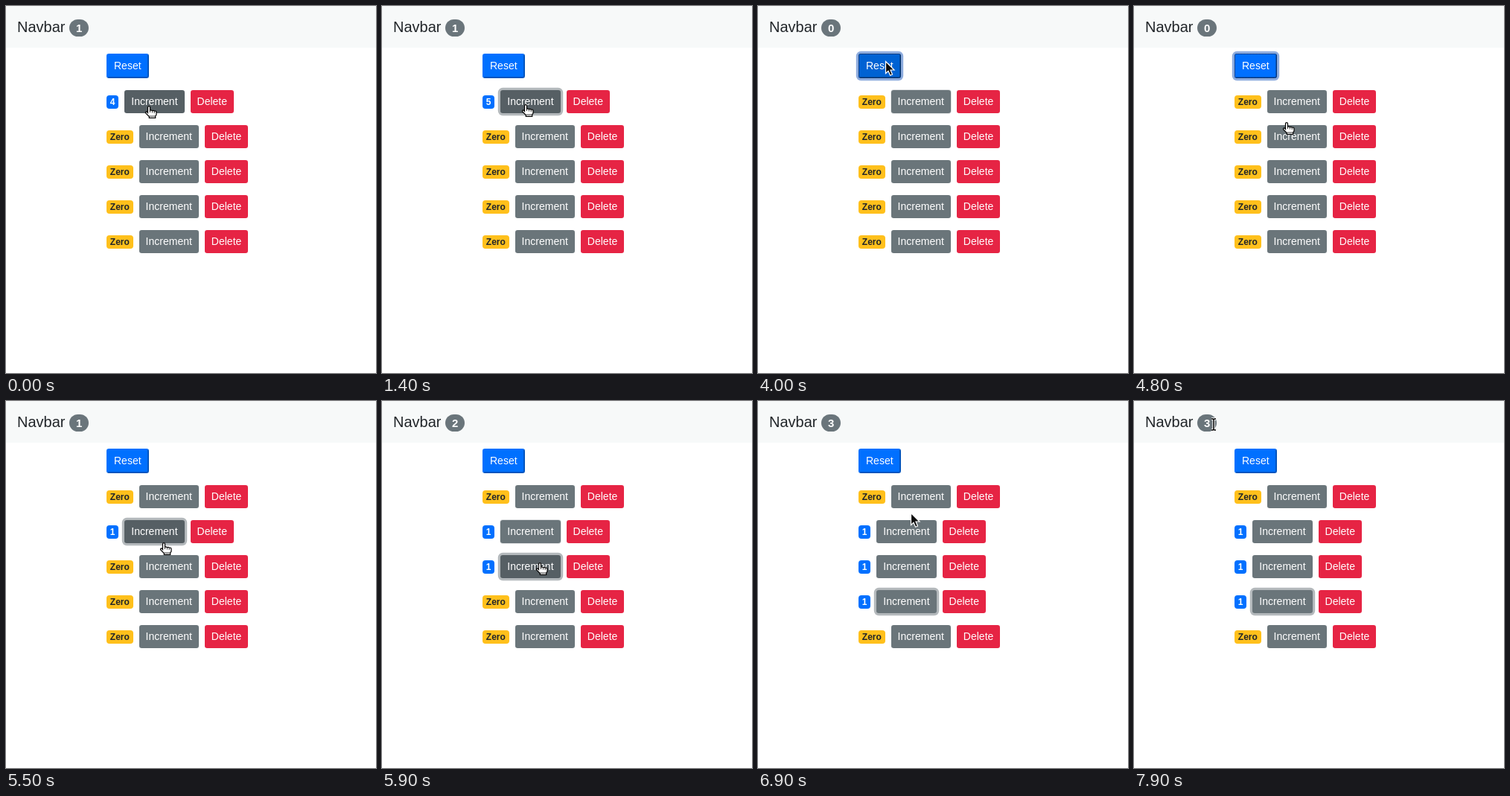
An HTML page that plays this animation: 497x493 px, repeating every 8000 ms.

```html
<!DOCTYPE html>
<html lang="en">
<head>
<meta charset="utf-8">
<title>Counters</title>
<style>
html, body { margin: 0; width: 100%; height: 100%; overflow: hidden; background: #fff; }
body { position: relative; font: 14px/21px "Liberation Sans", Arial, sans-serif; color: #212529; }
nav { height: 56px; padding: 13px 0 0 15px; box-sizing: border-box; background: #f7f9f9; font-size: 20px; line-height: 30px; white-space: pre; }
.badge { display: inline-block; padding: .25em .4em; border-radius: 4px; background: #0070ff; color: #fff; font-size: 12px; font-weight: 700; line-height: 1; }
.zero { background: #ffc01c; color: #212529; }
.pill { padding: .25em .6em; border-radius: 10rem; background: #6a757b; font-size: 15px; }
.btn { padding: 4px 8px; border: 1px solid transparent; border-radius: 3.2px; background: #6a757a; background-clip: border-box; color: #fff; }
.btn.hover { background: #565f64; }
.delete { background: #e62444; }
.row { position: absolute; left: 135px; display: flex; gap: 8px; align-items: flex-start; }
.row .badge { margin-top: 7px; }
.reset { position: absolute; left: 135px; top: 64px; background: #0070ff; border: 2px solid; border-color: #0070ff #0054bf #0054bf #0070ff; }
.reset.hover { background: #0062d3; border-color: #0062d3 #004a9f #004a9f #0062d3; }
.reset.focus { outline: 1px dotted #0a1830; outline-offset: -1px; }
svg { position: absolute; left: 0; top: 0; width: 497px; height: 493px; overflow: hidden; pointer-events: none; }
</style>
</head>
<body>
<nav>Navbar <span class="badge pill" id="total"></span></nav>
<main id="main"></main>
<svg><g id="pointer"></g></svg>
<script>
const LOOP = 8000, STEP = 100, RESET = -1;

// time, row clicked
const clicks = [[1400, 0], [2700, 0], [4000, RESET], [5100, 1], [5900, 2], [6600, 3]];

// time, x, y, and the pointer shape from then on
const path = [
  [0, 192, 134, "hand"], [300, 192, 134], [400, 193, 134], [500, 193, 134], [600, 193, 132],
  [2000, 193, 132], [2300, 193, 128], [3100, 193, 128, "arrow"], [3400, 171, 74],
  [4300, 171, 74], [4400, 175, 84, "hand"], [4900, 212, 174], [5200, 212, 174], [5300, 212, 177],
  [5400, 212, 177], [5500, 212, 190], [5700, 212, 217], [6200, 212, 218],
  [6300, 212, 218, "arrow"], [6400, 213, 264, "hand"], [6800, 213, 265],
  [6900, 205, 150, "arrow"], [7000, 150, 8], [7100, 115, 37, "beam"], [7300, 115, 37],
  [7400, 110, 37], [7500, 108, 37], [7800, 108, 37], [7900, 107, 31], [LOOP, 107, 31]
];

const shapes = {
  arrow: `<path d="M.5 .5V16.5L4 13.2L6.6 19.3L9.5 18L7 12H12Z" fill="#0c0c0c" stroke="#fff" stroke-width="1.2"/>`,
  hand: `<path d="M-1.5 9.5V2Q-1.5 .6 0 .6T1.5 2V6.2Q3 5.2 4.3 6.7Q6 5.7 7.2 7.2Q9.8 6.4 10 9V12L8.7 14V16.4H.3V14.5L-4.3 10Q-5 8-3 7.8Z" fill="#fff" stroke="#000" stroke-width="1.2"/>
    <path d="M1.5 6V9M4.4 7V9.5M7.2 7.5V10M.5 14H8.5" stroke="#000" stroke-width=".8" fill="none"/>`,
  beam: ["#fff 3.4", "#000 1.5"].map(s => {
    const [color, width] = s.split(" ");
    return `<path d="M-3-7H-1L0-6L1-7H3M0-6V7M-3 8H-1L0 7L1 8H3" fill="none" stroke="${color}" stroke-width="${width}"/>`;
  }).join("")
};

function pointerAt(t) {
  const i = path.findLastIndex(p => p[0] <= t);
  const [t0, x0, y0] = path[i], [t1, x1, y1] = path[i + 1] || [t + 1, x0, y0];
  const k = (t - t0) / (t1 - t0);
  const shape = path.slice(0, i + 1).findLast(p => p[3])[3];
  return { x: Math.round(x0 + (x1 - x0) * k), y: Math.round(y0 + (y1 - y0) * k), shape };
}

function stateAt(t) {
  const counts = [4, 0, 0, 0, 0];
  let focus = null, fading = null;
  for (const [time, row] of clicks) {
    if (time > t) break;
    if (row === RESET) counts.fill(0);
    else counts[row]++;
    fading = time === t && focus !== row ? focus : null;
    focus = row;
  }
  return { counts, focus, fading };
}

function draw(t) {
  const { counts, focus, fading } = stateAt(t);
  const { x, y, shape } = pointerAt(t);
  const inside = (left, top, w, h) => x >= left && x < left + w && y >= top && y < top + h;

  const button = (id, kind, label, hover) => {
    const rgb = id === RESET ? "30,90,190" : "106,117,122";
    const ring = id === focus ? `0 0 0 3.2px rgba(${rgb},.5)`
      : id === fading ? `0 0 0 1px rgba(${rgb},.2)` : "none";
    const classes = ["btn", kind, hover && "hover", id === focus && "focus"].filter(Boolean).join(" ");
    return `<div class="${classes}" style="box-shadow:${ring}">${label}</div>`;
  };

  const rows = counts.map((n, i) => {
    const top = 113 + 47 * i;
    return `<div class="row" style="top:${top}px">
      <span class="badge ${n ? "" : "zero"}">${n || "Zero"}</span>
      ${button(i, "", "Increment", inside(n ? 159 : 179, top, 80, 31))}
      <div class="btn delete">Delete</div></div>`;
  });
  main.innerHTML = button(RESET, "reset", "Reset", inside(135, 64, 57, 33)) + rows.join("");
  total.textContent = counts.filter(Boolean).length;
  pointer.innerHTML = shapes[shape];
  pointer.setAttribute("transform", `translate(${x} ${y})`);
}

const main = document.getElementById("main");
const total = document.getElementById("total");
const pointer = document.getElementById("pointer");
const start = performance.now();
let drawn = -1;

function tick() {
  const t = Math.floor((performance.now() - start) % LOOP / STEP) * STEP;
  if (t !== drawn) draw(drawn = t);
  requestAnimationFrame(tick);
}
tick();
</script>
</body>
</html>
```
